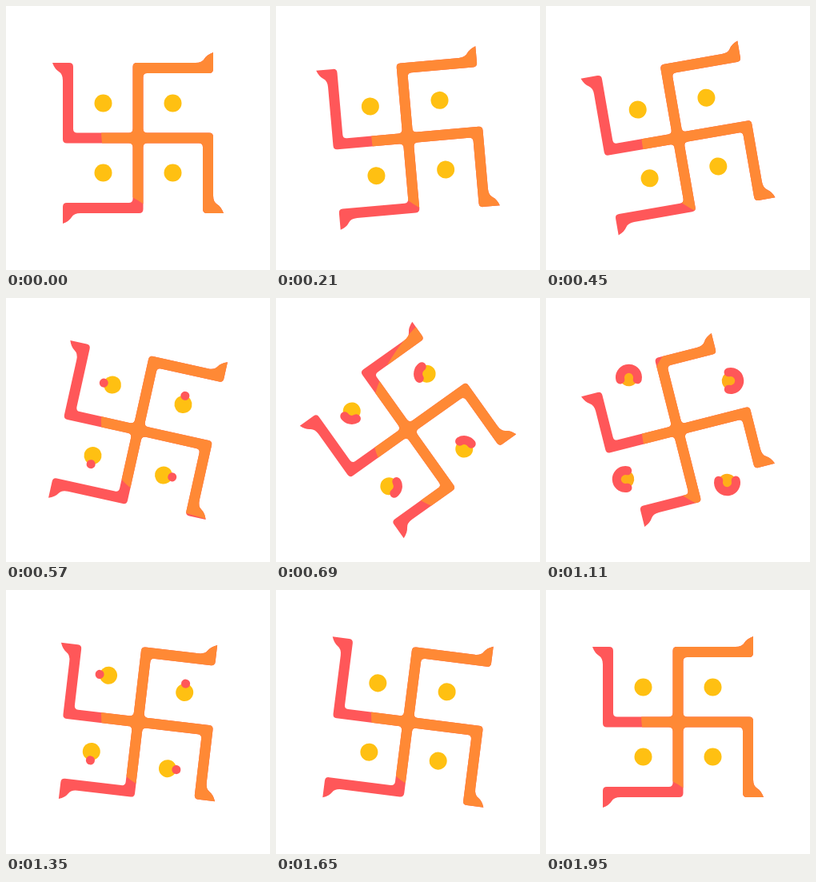
Animation of 330 by 330 pixels, one loop 2.25 s. Source, as an HTML page with a canvas:

```html
<!DOCTYPE html>
<html lang="en">
<head>
<meta charset="utf-8">
<title>Turning symbol</title>
<style>
html, body { margin: 0; width: 100%; height: 100%; overflow: hidden; background: #fff; }
canvas { display: block; width: 330px; height: 330px; }
</style>
</head>
<body>
<canvas id="stage" width="330" height="330"></canvas>
<script>
const ctx = document.getElementById('stage').getContext('2d');
const LOOP = 2250, STEP = 30, END = 1950, QUARTER = Math.PI / 2;
const RED = '#ff5759';

// time, degrees, degrees per ms
const turn = [
  [0, 0, 0], [430, -10.4, 0], [690, 54.5, .38], [870, 115.8, .3],
  [1110, 165.8, .13], [1350, 186.7, .045], [1480, 190.3, 0], [END, 180, 0]
];

// orange side of the fixed colour boundary
const warm = new Path2D(
  'M200 10L175 36C150 62 119 105 119 155C119 200 143 232 165 243' +
  'C185 257 205 266 222 268L330 300V0H200Z');

function hermite(keys, t) {
  let i = 0;
  while (i < keys.length - 2 && t > keys[i + 1][0]) i++;
  const [t0, a, va] = keys[i], [t1, b, vb] = keys[i + 1];
  const w = t1 - t0, s = Math.min(1, (t - t0) / w), r = 1 - s;
  return a * (1 + 2 * s) * r * r + b * s * s * (3 - 2 * s)
    + w * s * r * (va * r - vb * s);
}

function ease(t, from, to) {
  const u = Math.min(1, Math.max(0, (t - from) / (to - from)));
  return (1 - Math.cos(Math.PI * u)) / 2;
}

function addArm(pull) {
  const x = v => v - pull;
  ctx.moveTo(-6.5, 0);
  ctx.lineTo(-6.5, -89);
  ctx.quadraticCurveTo(-6.5, -94, -1.5, -94);
  ctx.lineTo(x(72), -94);
  ctx.quadraticCurveTo(x(80), -94, x(83), -99);
  ctx.quadraticCurveTo(x(86), -104, x(94), -107);
  ctx.lineTo(x(94), -86);
  ctx.quadraticCurveTo(x(94), -81, x(89), -81);
  ctx.lineTo(11.5, -81);
  ctx.quadraticCurveTo(6.5, -81, 6.5, -76);
  ctx.lineTo(6.5, -11.5);
  ctx.quadraticCurveTo(6.5, -6.5, 11.5, -6.5);
  ctx.lineTo(0, 0);
  ctx.closePath();
}

function drawArms(angle, pull, orange) {
  ctx.save();
  ctx.beginPath();
  ctx.translate(165, 165);
  ctx.rotate(angle);
  for (let i = 0; i < 4; i++) {
    addArm(pull);
    ctx.rotate(QUARTER);
  }
  ctx.setTransform(1, 0, 0, 1, 0, 0);
  ctx.clip();
  ctx.fillStyle = RED;
  ctx.fillRect(0, 0, 330, 330);
  ctx.fillStyle = orange;
  ctx.fill(warm);
  ctx.restore();
}

function drawDots(angle, out, head, tail, yellow) {
  ctx.save();
  ctx.translate(165, 165);
  ctx.rotate(angle);
  ctx.fillStyle = yellow;
  ctx.strokeStyle = RED;
  ctx.lineWidth = 11;
  ctx.lineCap = 'round';
  for (let i = 0; i < 4; i++) {
    const x = -43.5, y = -43.5 - out;
    ctx.beginPath();
    ctx.arc(x, y, 11, 0, 2 * Math.PI);
    ctx.fill();
    if (head > 0 && tail < 1) {
      const at = part => Math.PI - part * 2 * Math.PI;
      ctx.beginPath();
      ctx.arc(x, y, 11, at(head), at(tail));
      ctx.stroke();
    }
    ctx.rotate(QUARTER);
  }
  ctx.restore();
}

function draw(t) {
  const angle = hermite(turn, t) * Math.PI / 180;
  const spread = ease(t, 450, 990) - ease(t, 990, 1530);
  const orange = t >= 810 && t < 960 ? '#ff7b39' : '#ff8935';
  const yellow = t >= 810 && t < 1200 ? '#ffae19' : '#ffc012';
  ctx.fillStyle = '#fff';
  ctx.fillRect(0, 0, 330, 330);
  drawArms(angle, 27 * spread, orange);
  drawDots(angle, 40 * spread, ease(t, 560, 960), ease(t, 900, 1365), yellow);
}

const start = performance.now();
function tick(now) {
  const t = Math.max(0, now - start) % LOOP;
  draw(Math.min(END, Math.floor(t / STEP) * STEP));
  requestAnimationFrame(tick);
}
draw(0);
requestAnimationFrame(tick);
</script>
</body>
</html>
```
